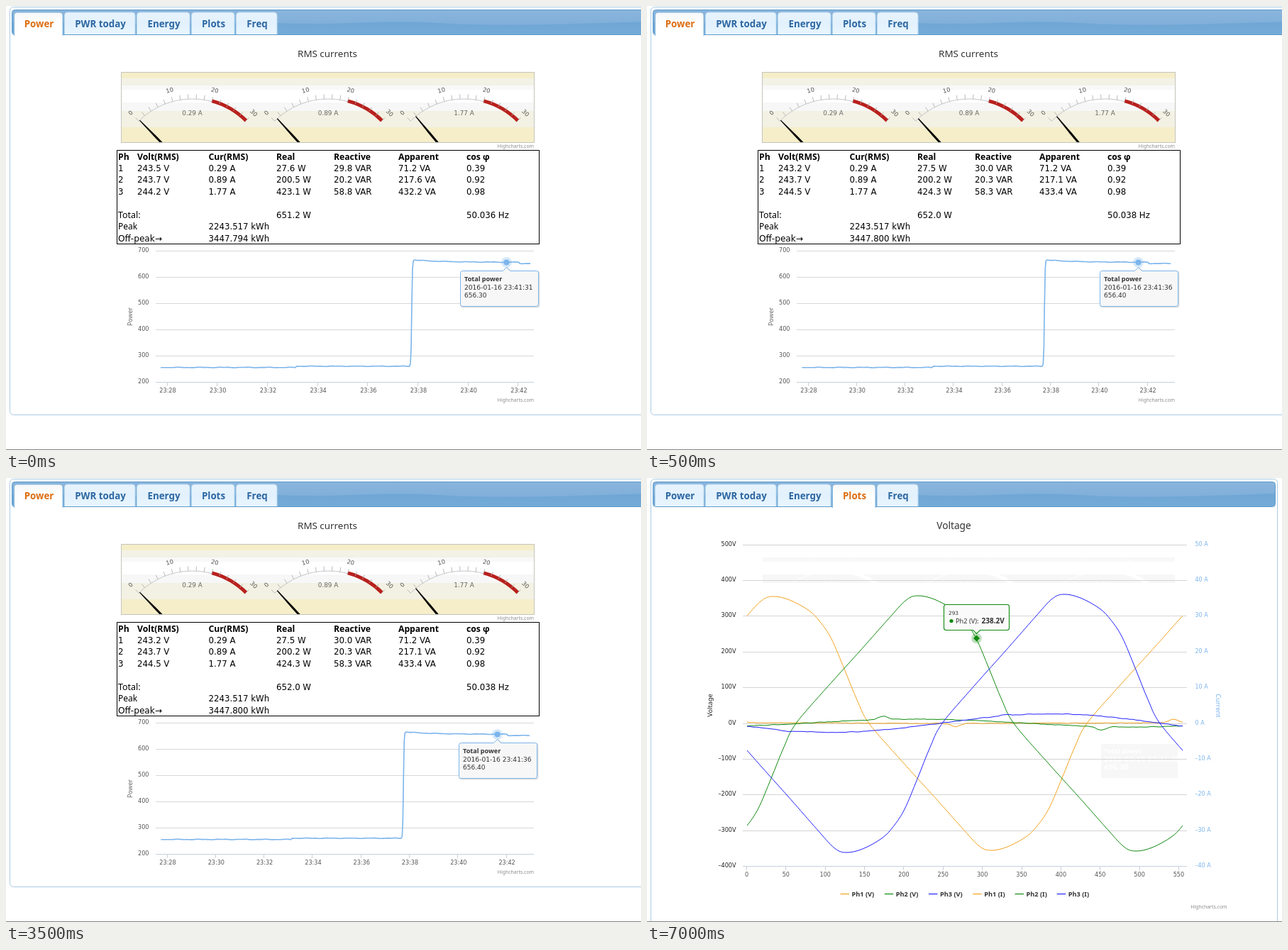
Write an HTML page that moves like this. It is 895 px wide and 626 px high and loops after 8 s.

```html
<!DOCTYPE html>
<html lang="en">
<head>
<meta charset="utf-8">
<title>Power monitor</title>
<style>
  html, body { margin: 0; width: 100%; height: 100%; overflow: hidden; background: #fff; }
  svg { display: block; }
  text { font-family: "Noto Sans", sans-serif; white-space: pre; }
  .num { font-family: "DejaVu Sans", sans-serif; }
  .bold { font-weight: bold; }
  .mid { text-anchor: middle; }
  .end { text-anchor: end; }
  .ghost * { stroke: #fff !important; }
  .ghost text { fill: #fff; stroke: none !important; }
</style>
</head>
<body>
<svg id="stage" width="895" height="626" viewBox="0 0 895 626" fill="none">
  <defs>
    <linearGradient id="bar" x2="0" y2="1">
      <stop stop-color="#8ab5dc"/><stop offset="1" stop-color="#78abd8"/>
    </linearGradient>
    <linearGradient id="wave" x2="0" y2="1">
      <stop stop-color="#6ea6d4"/><stop offset="1" stop-color="#74abd8"/>
    </linearGradient>
    <linearGradient id="tab" x2="0" y2="1">
      <stop stop-color="#e8f4fd"/><stop offset=".5" stop-color="#e2f1fd"/><stop offset="1" stop-color="#e9f6ff"/>
    </linearGradient>
    <linearGradient id="active" x2="0" y2="1">
      <stop stop-color="#f6f8f9"/><stop offset=".6" stop-color="#fff"/>
    </linearGradient>
    <clipPath id="gaugeClip"><rect x="163" y="94" width="581" height="98"/></clipPath>
    <clipPath id="ghostClip"><path d="M163 112h581v6H163zM163 136h581v12H163z"/></clipPath>
    <clipPath id="plotClip"><rect x="141" y="94" width="614" height="454"/></clipPath>
  </defs>
</svg>
<script>
const ORANGE = '#f2a31f', GREEN = '#0f8a0f', BLUE = '#2222ff', SKY = '#7cb5ec';
const range = n => [...Array(n).keys()];

const text = (x, y, size, str, cls = '', fill = '#000', extra = '') =>
  `<text x="${x}" y="${y}" font-size="${size}" class="${cls}" fill="${fill}" ${extra}>${str}</text>`;
const path = (d, stroke, width = 1, extra = '') =>
  `<path d="${d}" stroke="${stroke}" stroke-width="${width}" ${extra}/>`;
const rect = (x, y, w, h, fill, stroke = 'none', r = 0) =>
  `<rect x="${x}" y="${y}" width="${w}" height="${h}" rx="${r}" fill="${fill}" stroke="${stroke}"/>`;
const circle = (x, y, r, fill, opacity = 1) =>
  `<circle cx="${x}" cy="${y}" r="${r}" fill="${fill}" opacity="${opacity}"/>`;
const credit = (x, y) => text(x, y, 6.9, 'Highcharts.com', 'end', '#8c8c8c');

// Catmull-Rom spline through [x, y] points
function spline(pts) {
  const at = i => pts[Math.max(0, Math.min(pts.length - 1, i))];
  return 'M' + pts[0] + range(pts.length - 1).map(i => {
    const [a, b, c, e] = [at(i - 1), at(i), at(i + 1), at(i + 2)];
    return `C${b.map((v, k) => v + (c[k] - a[k]) / 6)} ${c.map((v, k) => v - (e[k] - b[k]) / 6)} ${c}`;
  }).join('');
}

function frame(activeTab, panelRight, panelBottom, barRight) {
  let left = 12;
  const tabs = [['Power', 68], ['PWR today', 99], ['Energy', 74], ['Plots', 60], ['Freq', 57]].map(([name, width]) => {
    const on = name === activeTab;
    const bottom = on ? 42 : 40;
    const right = left + width;
    const markup = `<path d="M${left - .5} ${bottom}V13q0-4 4-4H${right - 4}q4 0 4 4V${bottom}" fill="url(#${on ? 'active' : 'tab'})" stroke="${on ? '#83b6dc' : '#b9d9ef'}"/>`
      + text((left + right) / 2 + .5, 30, 13.3, name, 'bold mid', on ? '#dc6d12' : '#2c67a2');
    left = right + 3;
    return markup;
  }).join('');
  return rect(5.5, 1.5, panelRight - 5.5, panelBottom - 1.5, '#fff', '#a9cbe2', 5)
    + rect(8.5, 5.5, barRight - 8.5, 35, 'url(#bar)', '#5b9bcd', 4)
    + `<path fill="url(#wave)" d="M9 24H383C470 28 520 19 610 24S760 26 ${barRight - .5} 22V40H9Z"/>`
    + tabs + path('M0 625.5H895', '#858585');
}

function gauge(cx, amps) {
  const cy = 237.5, R = 106.5;
  const degrees = value => value * 3 - 45;
  const polar = (value, r) => {
    const a = degrees(value) * Math.PI / 180;
    return [cx + r * Math.sin(a), cy - r * Math.cos(a)];
  };
  const arc = (from, to, r) => `M${polar(from, r)}A${r} ${r} 0 0 1 ${polar(to, r)}`;
  const ticks = range(16).map(i => `M${polar(i * 2, R)}L${polar(i * 2, R + 6.5)}`).join('');
  const labels = [0, 10, 20, 30].map(v => {
    const [x, y] = polar(v, 120);
    return text(x, y, 8.3, v, 'num mid', '#555', `transform="rotate(${degrees(v)} ${x} ${y})"`);
  }).join('');
  return path(arc(0, 30, R), '#c3c6cc')
    + path(arc(20, 30, R + .8), '#b8201c', 5)
    + path(ticks, '#a9a9a9', .8)
    + labels
    + text(cx, 154, 8.8, amps.toFixed(2) + ' A', 'num mid', '#666')
    + `<path fill="#000" d="M${cx - .6} ${cy - R}h1.2l.9 32V${cy}h-3v${32 - R}z" transform="rotate(${degrees(amps)} ${cx} ${cy})"/>`;
}
const gauges = () => [.29, .89, 1.77].map((amps, i) => gauge(262.5 + 191.5 * i, amps)).join('');

function gaugePanel() {
  const bands = [[94, '#f5eec9'], [102, '#f3f2e6'], [112, '#f8f8f8'], [118, '#fff'], [136, '#f7f7f7'], [148, '#f3f1e3'], [171, '#f5eec9']];
  return text(453, 72, 13.4, 'RMS currents', 'mid', '#333')
    + bands.map(([y, color]) => rect(163, y, 581, 192 - y, color)).join('')
    + `<g clip-path="url(#gaugeClip)">${gauges()}</g>`
    + rect(162.5, 93.5, 582, 99, 'none', '#c4c4bc')
    + credit(744, 200);
}

function table(s) {
  const cols = [158, 185, 285.5, 381, 462, 553, 649];
  const cell = (col, row, str, cls = 'num', size = 11.75) => text(cols[col], 216.5 + 16.43 * row, size, str, cls);
  const head = ['Ph', 'Volt(RMS)', 'Cur(RMS)', 'Real', 'Reactive', 'Apparent', 'cos φ'];
  const units = ['', ' V', ' A', ' W', ' VAR', ' VA', ''];
  return rect(156.5, 203.5, 595, 132, '#fff', '#000')
    + head.map((h, i) => cell(i, 0, h, 'bold', 12.2)).join('')
    + s.phases.map((row, r) => row.split(' ').map((v, i) => cell(i, r + 1, v + units[i])).join('')).join('')
    + cell(0, 5, 'Total:', '', 12.4) + cell(3, 5, s.total + ' W') + cell(6, 5, s.hertz + ' Hz')
    + cell(0, 6, 'Peak', '', 12) + cell(2, 6, '2243.517 kWh')
    + cell(0, 7, 'Off-peak→', 'num', 12.1) + cell(2, 7, s.offPeak + ' kWh');
}

// Power curve height; x is on the 70.7 px per two minutes scale
function powerY(x) {
  const low = x < 409 ? 509.6 : 507.9;
  const high = 358 + 3.3 * (1 - Math.exp((575 - x) / 40)) + (x > 723 ? 1.8 : 0);
  const rise = 1 / (1 + Math.exp((571.8 - x) / .5));
  return low + (high - low) * rise + .25 * Math.sin(x / 5) + .15 * Math.sin(x / 2.3);
}

const tipText = (x, time, value, color, cls = '') =>
  text(x, 388.3, 9.1, 'Total power', 'bold', color)
  + text(x, 399.5, 9.1, '2016-01-16 ' + time, 'num ' + cls, color)
  + text(x, 410.5, 9, value, 'num ' + cls, color);

function powerChart(s) {
  const { step, tipX, markerX } = s;
  const scale = step / 70.7;
  const line = range(Math.floor(511 / scale) + 11)
    .map(i => `${228 + (i - 10) * scale} ${powerY(218 + i).toFixed(1)}`);
  const box = `M${tipX + 3} 373.5H${markerX - 5}l5-5 5 5H${tipX + 107}q3 0 3 3V420.5q0 3-3 3H${tipX + 3}q-3 0-3-3V376.5q0-3 3-3z`;
  return range(6).map(i => path(`M211 ${Math.floor(345 + 37.1 * i) + .5}H744`, i < 5 ? '#d8d8d8' : '#c6d0dc')
      + text(201.5, 346.5 + i * 37.1, 8.1, 700 - i * 100, 'num end', '#555')).join('')
    + range(8).map(i => path(`M${Math.floor(228 + i * step) - .5} 531v5`, '#c6d0dc')
      + text(228 + i * step, 545, 8.1, '23:' + (28 + i * 2), 'num mid', '#555')).join('')
    + text(0, 0, 8.8, 'Power', 'mid', '#666', 'transform="translate(178 438) rotate(-90)"')
    + path('M' + line.join('L'), SKY, 1.6, 'stroke-linejoin="round"')
    + circle(markerX, 361.5, 7.5, SKY, .3) + circle(markerX, 361.5, 4, SKY)
    + path(box, '#000', 2, 'opacity=".13" transform="translate(1 1)"')
    + path(box, SKY, 1, 'fill="#f7f7f7"')
    + tipText(tipX + 5.5, s.time, s.value, '#333')
    + credit(744, 557.5);
}

const powerScene = s => frame('Power', 910, 576.5, 910) + gaugePanel() + table(s) + powerChart(s);

const HALF = 307, ZERO_Y = 346;
// Half of a voltage cycle: distance from the zero crossing, share of the peak
const HALF_WAVE = [[0, 0], [45, .29], [93, .585], [130, .817], [155, .965], [172, 1], [195, .972],
  [222, .89], [238, .8], [254, .665], [272, .43], [290, .185]];

const voltage = p => spline(range(5).flatMap(k => HALF_WAVE.map(([dx, share]) =>
  [p.zero + (k - 3) * HALF + dx, ZERO_Y + (k % 2 ? -1 : 1) * p.peak * share])));

// Load current: a sine plus a short spike that flips sign every half cycle
function current(p) {
  return 'M' + range(124).map(i => {
    const x = 140 + i * 5;
    const half = Math.round((x - p.spikeAt) / HALF);
    const spike = Math.exp(-(((x - p.spikeAt - half * HALF) / 9) ** 2)) * (half % 2 ? -1 : 1);
    const noise = .35 * Math.sin(i * i * 1.7 + p.zero);
    const y = 345.5 - p.load * Math.sin(Math.PI * (x - p.loadZero) / HALF) - p.spike * spike + noise;
    return `${x} ${y.toFixed(1)}`;
  }).join('L');
}

const phases = [
  { color: ORANGE, zero: 620, peak: 179, load: .4, loadZero: 600, spikeAt: 742, spike: 5 },
  { color: GREEN, zero: 210, peak: 180, load: 5.5, loadZero: 225, spikeAt: 333, spike: 5 },
  { color: BLUE, zero: 416, peak: 182, load: 13, loadZero: 415, spikeAt: 505, spike: 1.5 }
];

function plotsScene() {
  const ghosts = rect(163, 112, 581, 6, '#f8f8f8') + rect(163, 136, 581, 12, '#f7f7f7')
    + `<g class="ghost" clip-path="url(#ghostClip)">${gauges()}</g>`
    + rect(640, 375, 108, 48, '#f7f7f7') + tipText(644, '23:41:36', '656.30', '#fff', 'bold');
  const signed = n => String(n).replace('-', '–');
  const rows = range(10).map(i => {
    const y = Math.floor(94 + i * 50.4) + .5;
    return path(`M135 ${y}H761`, i < 9 ? '#d4d4d4' : '#c6d0dc')
      + text(125.5, y + 1.5, 8.1, signed(500 - i * 100) + 'V', 'num end', '#222')
      + text(772.5, y + 1.5, 8, signed(50 - i * 10) + ' A', 'num', SKY);
  }).join('');
  const columns = range(12).map(i => {
    const x = 140.5 + i * 55.36;
    return path(`M${Math.floor(x) + .5} 548v5`, '#c6d0dc') + text(x, 562.3, 8.1, i * 50, 'num mid', '#555');
  }).join('');
  const legend = range(6).map(i => {
    const x = 272.5 + i * 62.25 - Math.max(0, i - 3) * 3;
    const name = `Ph${i % 3 + 1} (${i < 3 ? 'V' : 'I'})`;
    return path(`M${x} 586.5h12.5`, phases[i % 3].color, 1.2) + text(x + 16, 589.7, 9.2, name, 'bold', '#333');
  }).join('');
  const tip = path('M421.5 178.5H507.5q3 0 3 3V211.5q0 3-3 3H469.5l-5 5-5-5H421.5q-3 0-3-3V181.5q0-3 3-3z', GREEN, 1.1, 'fill="#fafafa"')
    + text(425, 193, 7.3, '293', 'num', '#333')
    + circle(429, 201.5, 2.6, GREEN)
    + text(435, 204.5, 9.2, 'Ph2 (V):', '', '#333')
    + text(471.5, 204.5, 10, '238.2V', 'bold', '#333');
  return frame('Plots', 888.5, 640, 885.5)
    + ghosts
    + text(432.5, 72.3, 13.7, 'Voltage', 'mid', '#333')
    + rows + columns
    + text(0, 0, 9.2, 'Voltage', 'mid', '#222', 'transform="translate(91.5 320.5) rotate(-90)"')
    + text(0, 0, 9.3, 'Current', 'mid', SKY, 'transform="translate(802 321) rotate(90)"')
    + `<g clip-path="url(#plotClip)">${phases.map(p => path(voltage(p), p.color) + path(current(p), p.color)).join('')}</g>`
    + circle(464.5, 226, 7.3, GREEN, .28)
    + `<path fill="${GREEN}" d="M464.5 221.5l4.5 4.5-4.5 4.5-4.5-4.5z"/>`
    + tip + legend + credit(817.5, 606.7);
}

const scenes = [
  [500, powerScene({
    phases: ['1 243.5 0.29 27.6 29.8 71.2 0.39', '2 243.7 0.89 200.5 20.2 217.6 0.92', '3 244.2 1.77 423.1 58.8 432.2 0.98'],
    total: '651.2', hertz: '50.036', offPeak: '3447.794',
    step: 70.7, tipX: 640.5, markerX: 705.5, time: '23:41:31', value: '656.30'
  })],
  [5500, powerScene({
    phases: ['1 243.2 0.29 27.5 30.0 71.2 0.39', '2 243.7 0.89 200.2 20.3 217.1 0.92', '3 244.5 1.77 424.3 58.3 433.4 0.98'],
    total: '652.0', hertz: '50.038', offPeak: '3447.800',
    step: 68.3, tipX: 638.5, markerX: 692.5, time: '23:41:36', value: '656.40'
  })],
  [8000, plotsScene()]
];

const stage = document.getElementById('stage');
stage.insertAdjacentHTML('beforeend', scenes.map(([, markup]) => `<g class="scene">${markup}</g>`).join(''));
const groups = [...stage.querySelectorAll('.scene')];

function draw() {
  const time = performance.now() % 8000;
  const current = scenes.findIndex(([end]) => time < end);
  groups.forEach((g, i) => g.style.display = i === current ? '' : 'none');
  requestAnimationFrame(draw);
}
draw();
</script>
</body>
</html>
```
